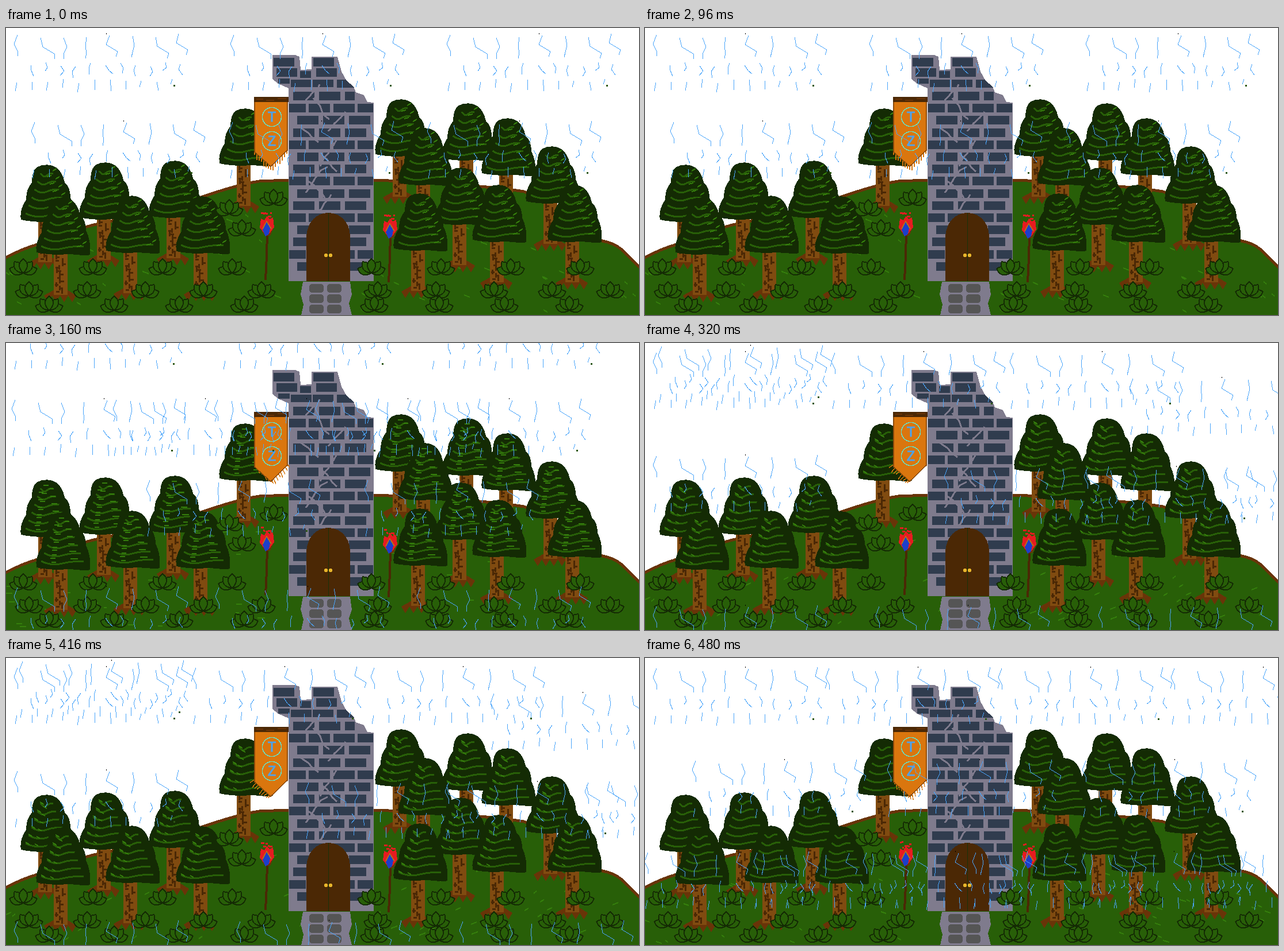
An HTML page that plays this animation: 1100x500 px, repeating every 0.64 s.

```html
<!DOCTYPE html>
<html lang="en">
<head>
<meta charset="utf-8">
<title>Rain on the tower</title>
<style>
html, body { margin: 0; width: 100%; height: 100%; overflow: hidden; background: #fff; }
svg { display: block; width: 1100px; height: 500px; }
path, rect, circle { shape-rendering: crispEdges; }
text { font: 23px Arial, "Liberation Sans", sans-serif; text-anchor: middle; fill: #4ba3ef; stroke: #4ba3ef; }
</style>
</head>
<body>
<svg id="stage" viewBox="0 0 1100 500"></svg>
<script>
const DARK = '#142b04', LEAF = '#285f08', GRASS = '#357f0c', GREY = '#7f7b8d', BRICK = '#303c4e',
      WOOD = '#4b2805', BARK = '#804b10', ROOT = '#693408', RAIN = '#4aa5fa', RED = '#e61b20';

const fill = (d, c) => `<path d="${d}" fill="${c}"/>`;
const line = (d, c, w = 1) => `<path d="${d}" fill="none" stroke="${c}" stroke-width="${w}"/>`;
const rect = (x, y, w, h, c, r = 0) => `<rect x="${x}" y="${y}" width="${w}" height="${h}" fill="${c}" rx="${r}"/>`;
const at = (x, y, s) => `<g transform="translate(${x} ${y})">${s}</g>`;
const range = (n, f) => Array.from({ length: n }, (_, i) => f(i)).join('');
const place = (points, s) => points.map(([x, y]) => at(x, y, s)).join('');

// Seeded whole number between a and b
function random(seed) {
  return (a, b) => {
    seed = seed * 16807 % 2147483647;
    return Math.floor(a + seed / 2147483647 * (b - a + 1));
  };
}

// Each rain band repeats one cloud: [x, y, step, count].
const poses = [
  { sway: 0, rain: [[0, -2, 376, 3], [30, 150, 344, 3]] },
  { sway: 5, rain: [[-1, -66, 363, 3], [-4, 85, 176, 5], [230, 225, 379, 2], [0, 412, 350, 3]] },
  { sway: -8, rain: [[9, -8, 0, 1], [0, 3, 310, 3], [828, 48, 0, 1], [0, 183, 0, 1], [506, 203, 243, 3], [0, 445, 387, 3]] },
  { sway: 2, rain: [[0, 4, 300, 4], [68, 165, 339, 3], [-15, 325, 190, 6]] }
];

function cloud() {
  const rnd = random(41);
  const long = range(8, i => {
    const turn = rnd(-6, 6), drift = i % 3 === 1 || i > 5 ? 20 : -turn;
    return `M${20 + i * 40} ${rnd(11, 20)}l${turn} 16 ${drift} 12 ${rnd(-3, 1)} 9`;
  });
  const bent = range(11, i => `M${43 + i * 26} ${rnd(62, 69)}l${rnd(-6, 6)} 9 ${rnd(-10, 8)} ${rnd(5, 11)}`);
  const short = range(11, i => `M${19 + i * 27} ${rnd(91, 98)}l${rnd(-3, 3)} ${rnd(9, 20)}`);
  return line(long + bent + short, RAIN) + rect(174, 11, 1, 2, '#000') + rect(291, 101, 3, 3, '#2c5715');
}

const shower = bands => bands.map(([x, y, step, n]) => range(n, i => at(x + i * step, y, cloud()))).join('');

// Trees
const crown = 'M30 3C38-2 54-2 62 4C70 9 75 20 77 30C84 36 87 46 87 57C92 66 96 82 94 99' +
  'C85 102 70 98 55 98C35 100 15 98 1 95C-1 84 2 72 10 60C10 45 14 38 20 30C20 15 24 6 30 3Z';
const glints = [
  i => `M${56 + i * 5} ${10 + i * 14}l7-4M${46 + i * 5} ${20 + i * 13}l8-2`,
  i => `M${40 - i * 3} ${9 + i * 14}h9M${50 + i * 2} ${15 + i * 13}h${8 + i}M${32 - i} ${21 + i * 13}h8`,
  i => `M${34 - i * 5} ${12 + i * 14}l7 4M${40 - i * 3} ${20 + i * 13}l6 3`,
  () => ''
];

function tree(pose) {
  const rnd = random(9);
  const roots = range(9, i => `L${14 + i * 7} ${i % 2 ? 182 : 170}`);
  const bark = range(11, i => rect(rnd(34, 47), 99 + i * 6, 3, 8, WOOD) + rect(rnd(33, 46), 102 + i * 6, 6, 3, WOOD));
  const waves = range(6, i => {
    const half = 11 + i * 5.2;
    return `M${46 - half} ${14 + i * 14}q${half / 2} 9 ${half} 4t${half} -3`;
  });
  return fill('M32 160' + roots + 'L54 160Z', ROOT) + rect(31, 93, 24, 76, BARK) + bark +
    fill(crown, DARK) + line(waves, LEAF, 3) + line(range(6, glints[pose]), GRASS, 2);
}

const backTrees = [[25, 239], [127, 235], [248, 232], [370, 141], [641, 125], [757, 132],
  [826, 158], [682, 175], [903, 207], [745, 244]];
const frontTrees = [[52, 296], [173, 293], [295, 294], [673, 289], [810, 274], [941, 274]];

// Bushes: three rows broken by the road, and a few on the hill
const bush = [-72, 72, -38, 38, 0].map(a => `<path transform="translate(0 12) rotate(${a})" ` +
  `d="M0 0Q-14-14 0-25Q14-14 0 0" fill="${LEAF}" stroke="${DARK}" stroke-width="2"/>`).join('');
const bushes = [[388, 312], [410, 347], [465, 294]];
for (const [x0, y, step] of [[30, 415, 121], [40, 455, 101], [75, 480, 113]])
  for (let x = x0; x < 1060; x += step)
    if (x < 500 || x > 610) bushes.push([x, y]);

// Hill
const hill = 'M-4 402Q25 386 52 378C90 360 130 346 200 333C290 318 370 278 440 267L490 265H640' +
  'C720 268 840 275 900 285C960 304 1000 345 1036 371Q1055 374 1070 386L1104 420V504H-4Z';

function grass(pose) {
  const rnd = random(77 + pose), slope = [4, 0, -4, 3][pose];
  return line(range(60, () => {
    const x = rnd(0, 1090), top = Math.floor(290 + Math.abs(x - 550) * .23);
    return `M${x} ${rnd(top, 495)}l${rnd(5, 11)} ${slope}`;
  }), GRASS, 2);
}

// Tower
const wall = 'M491 105V441H639V130L628 129 622 117 608 112 604 102 592 92 583 76 576 50H531V72L512 73 510 50 ' +
  '503 47H463V89L473 97Z';

function course(r) {
  const start = [499, 484, 506][r % 3], step = r % 3 === 1 ? 42.5 : 45;
  return range(4, i => {
    const x = Math.max(492, Math.floor(start + i * step)), end = Math.min(638, Math.floor(start + i * step + 37));
    const room = r ? 638 : 606;
    return x < room - 8 ? rect(x, Math.round(111 + r * 21.2), Math.min(end, room) - x, 15, BRICK) : '';
  });
}

function cracks() {
  const rnd = random(23);
  return line(range(9, i => {
    const dir = i % 2 ? 1 : -1;
    return `M${i % 2 ? rnd(503, 565) : rnd(545, 600)} ${98 + i * 24}` +
      range(4, () => `l${dir * rnd(3, 13)} ${rnd(4, 14)}`);
  }), GREY, 3);
}

function tower() {
  const turrets = [465, 534].map(x => rect(x, 52, 36, 15, BRICK) + rect(x + 5, 70, 36, 15, BRICK) +
    rect(x - 1 + (x < 500 ? 31 : 0), 90, 36, 13, BRICK)).join('');
  return fill(wall, GREY) + range(15, course) + turrets +
    rect(473, 88, 20, 9, BRICK) + rect(511, 75, 19, 12, BRICK) + fill('M575 90H590L606 104H575Z', BRICK) + cracks() +
    fill('M522 441V362C524 337 540 322 560 322S597 337 598 362V441Z', WOOD) + line('M560.5 322V441', '#17320a') +
    [556, 564].map(x => `<circle cx="${x}" cy="396" r="3" fill="#e7b52b"/>`).join('');
}

const stones = range(6, i => rect(527 + i % 2 * 31, 446 + (i >> 1) * 18, 25, 15, '#555', 5));
const road = fill('M516 442H598L601 465 596 480 601 500H513L517 482 512 464Z', GREY) + stones;

function torch(pose) {
  const rnd = random(5 + pose * 31);
  const sparks = range(5, i => `M${-10 + i * 4} ${rnd(0, 8)}l${rnd(3, 6)} ${rnd(-2, 2)}`);
  return line('M1 34L0 75-2 117', WOOD, 4) + fill('M-12 26L-3 40H6L13 25Z', ROOT) +
    fill('M-12 26L-10 10-4 13 0 6 5 11 11 8 13 25 4 37-4 36Z', RED) +
    line('M-7 28L0 15 8 28', '#b27619', 2) + fill('M0 16L6 27 4 37-2 41-7 30Z', '#1c3fca') + line(sparks, RED, 3);
}

function banner(sway) {
  const fringe = range(15, i => {
    const x = 432 + i * 4, y = x < 460 ? 215 + (x - 432) * .9 : 241 - (x - 460);
    return `M${x} ${y - 3}l${sway} ${9 + i * 5 % 7 - Math.abs(sway) / 2}`;
  });
  const badge = (y, s) => `<circle cx="462" cy="${y}" r="16.5" fill="none" stroke="#65e0c5" stroke-width="1.5"/>` +
    `<text x="462" y="${y + 8}">${s}</text>`;
  return line(fringe, '#d5750c', 1.5) + fill('M432 129H490V213L460 241 432 216Z', '#da760e') +
    line('M432 129V216L460 241 489 213V129', '#8b4a0b', 1.5) + rect(431, 120, 60, 9, WOOD) +
    line('M435 124h12M452 126h14M472 123h15', ROOT, 2) + badge(155, 'T') + badge(197, 'Z');
}

function scene({ sway, rain }, i) {
  const t = tree(i);
  return '<g visibility="hidden">' +
    `<path d="${hill}" fill="${LEAF}" stroke="${ROOT}" stroke-width="5"/>` + grass(i) +
    place(backTrees, t) + tower() + road + banner(sway) +
    place([[453, 322], [667, 326]], torch(i)) + place(frontTrees, t) + place(bushes, bush) + shower(rain) + '</g>';
}

const stage = document.getElementById('stage');
stage.innerHTML = poses.map(scene).join('');
const layers = [...stage.children], start = performance.now();

function tick() {
  const now = Math.floor((performance.now() - start) / 160) % 4;
  layers.forEach((g, i) => g.setAttribute('visibility', i === now ? 'visible' : 'hidden'));
  requestAnimationFrame(tick);
}
tick();
</script>
</body>
</html>
```
